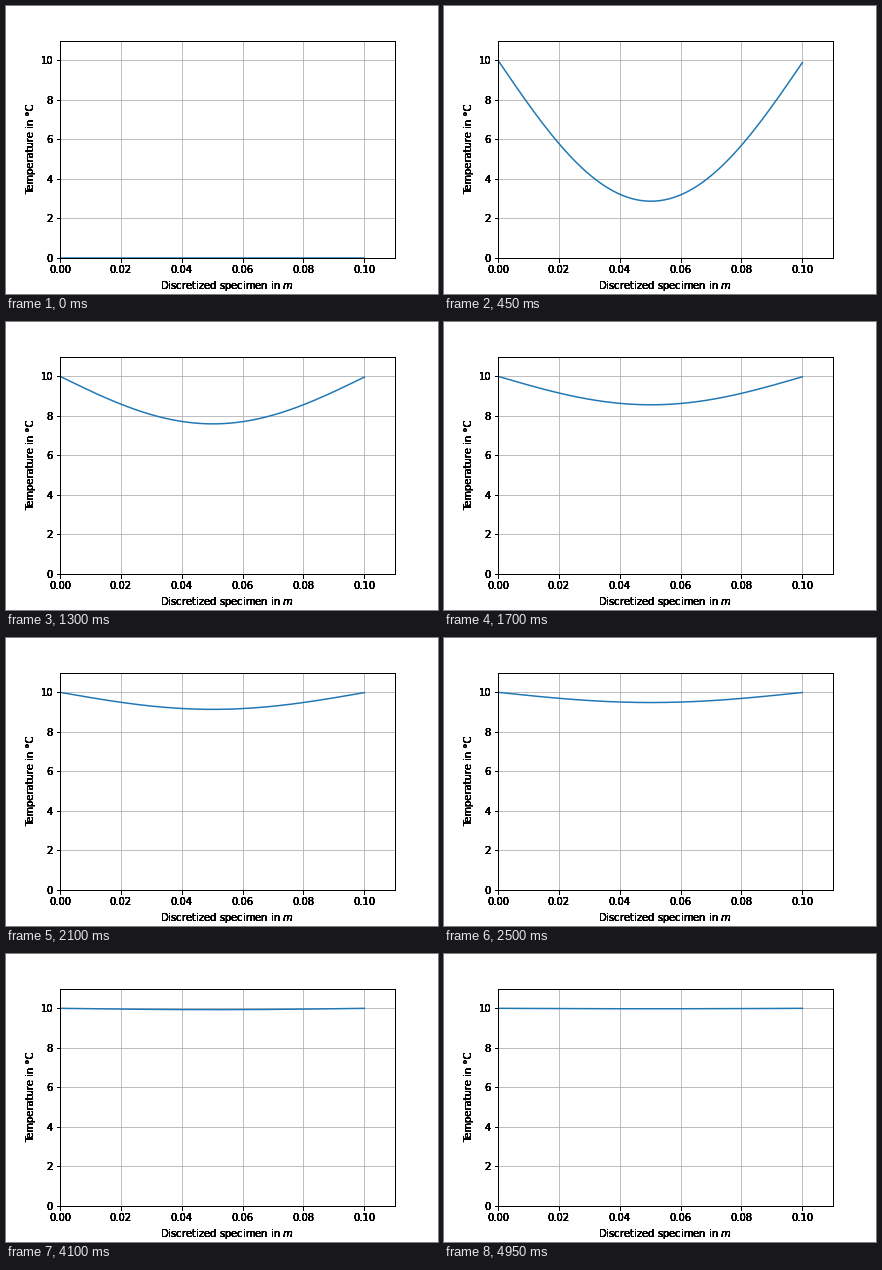
A matplotlib script for the animation above (5.05 s loop, 432x288 px).

```python
import matplotlib.pyplot as plt
import numpy as np
from matplotlib.animation import FuncAnimation

FRAMES, INTERVAL = 101, 50
LENGTH = 0.1          # plotted part of the rod, m
ROD = 0.1005          # distance between the two heated ends, m
T_END = 10.0          # temperature held at both ends
DECAY = 0.0641        # decay of the slowest mode per frame
INK_PASSES = 8

x = np.linspace(0, LENGTH, 201)
modes = np.arange(1, 80, 2)
shapes = 4 * T_END / (np.pi * modes) * np.sin(np.pi * np.outer(x, modes) / ROD)


def temperature(step):
    """Cold rod warmed from both ends, as a Fourier series."""
    if step == 0:
        return np.zeros_like(x)
    return T_END - shapes @ np.exp(-DECAY * step * modes**2)


def overprint(artist):
    """Draw an artist several times so its soft edges turn dark."""
    draw = artist.draw

    def draw_many(renderer):
        for _ in range(INK_PASSES):
            draw(renderer)

    artist.draw = draw_many


plt.rcParams["font.family"] = "DejaVu Sans"
fig, ax = plt.subplots(figsize=(6, 4), dpi=72, facecolor="white")
fig.subplots_adjust(left=0.125, right=0.9, bottom=0.125, top=0.88)
ax.set_xlim(0, 0.11)
ax.set_ylim(0, 11)
ax.set_xticks(np.arange(6) * 0.02)
ax.set_yticks(np.arange(0, 11, 2))
ax.set_xlabel("Discretized specimen in $m$")
ax.set_ylabel("Temperature in °C")
ax.grid(True)

line, = ax.plot(x, temperature(0), color="C0", lw=1.5)

for axis in (ax.xaxis, ax.yaxis):
    overprint(axis.label)
    for tick in axis.get_major_ticks():
        overprint(tick.label1)
        overprint(tick.tick1line)
for spine in ax.spines.values():
    overprint(spine)


def update(i):
    line.set_ydata(temperature(min(i, FRAMES - 2)))
    return line,


anim = FuncAnimation(fig, update, frames=FRAMES, interval=INTERVAL, repeat=True)
plt.show()
```
